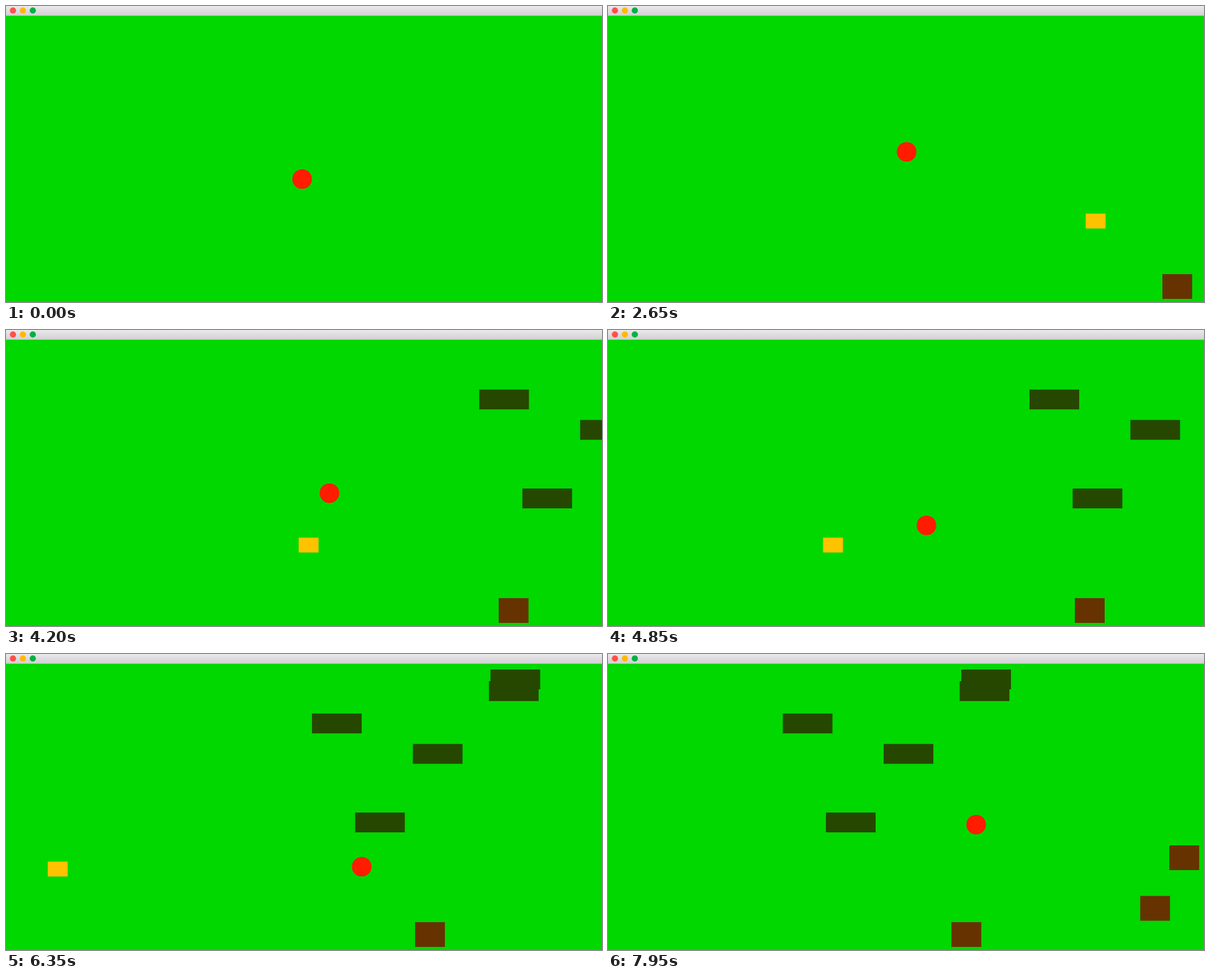
These frames come from a looping animation (960 px wide and 478 px high, 8 s). An HTML page with a canvas:

```html
<!DOCTYPE html>
<html lang="en">
<head>
<meta charset="utf-8">
<title>Dodge game</title>
<style>
html, body { margin: 0; width: 100%; height: 100%; overflow: hidden; background: #00d800; }
canvas { display: block; }
</style>
</head>
<body>
<canvas id="stage" width="960" height="478"></canvas>
<script>
const W = 960, H = 478, LOOP = 8000, TICK = 50, STEP = 4;
const ctx = document.getElementById('stage').getContext('2d');

// Ball waypoints: time, then steps right and down from home
const home = { x: 477, y: 279.5 };
const route = [[0, 0, 0], [1300, 1, -3], [2650, 1, -11], [3500, 13, -18],
  [4850, 9, 9], [6350, 24, 16], [7950, 29, -1]];

function rect(color, x, y, w, h) {
  ctx.fillStyle = color;
  ctx.fillRect(x, y, w, h);
}

function disc(color, x, y, r) {
  ctx.fillStyle = color;
  ctx.beginPath();
  ctx.arc(x, y, r, 0, Math.PI * 2);
  ctx.fill();
}

// Steady scroll with one short lag
function scrollAt(t) {
  return 0.0641 * (t - 2650) - 3.2 * Math.exp(-(((t - 6400) / 300) ** 2));
}

function drawBlocks(t) {
  const d = scrollAt(t);
  const block = (color, speed, w, h) => (x, y) => rect(color, x - d * speed, y, w, h);
  const crate = block('#663300', 1, 48, 40);
  const log = block('#264700', 2, 80, 32);
  const coin = block('#ffc200', 3, 32, 24);

  crate(893, 433);
  crate(1197, 390.7);
  crate(1244, 309);
  log(961, 96.2);
  log(1030.5, 256);
  log(1123.5, 145.3);
  log(1246, 44);
  log(1248.5, 25);
  coin(769.5, 335.3);
}

function drawBall(t) {
  const next = Math.max(1, route.findIndex(p => p[0] >= t));
  const [t0, x0, y0] = route[next - 1], [t1, x1, y1] = route[next];
  const p = (t - t0) / (t1 - t0);
  const along = (a, b) => Math.round(a + (b - a) * p) * STEP;
  disc('#ff1c00', home.x + along(x0, x1), home.y + along(y0, y1), 15.8);
}

const barFill = ctx.createLinearGradient(0, 0, 0, 15);
barFill.addColorStop(0, '#ebe9eb');
barFill.addColorStop(1, '#d2d0d2');

function drawBar() {
  rect(barFill, 0, 0, W, 15);
  rect('#b4b4b4', 0, 15, W, 1);
  ['#ff5147', '#ffb900', '#00b144'].forEach((c, i) => disc(c, 11.2 + i * 16, 7.3, 5));
}

function draw(t) {
  rect('#00d800', 0, 0, W, H);
  if (t >= 1700) drawBlocks(t);
  drawBall(t);
  drawBar();
}

const start = performance.now();
function frame() {
  const t = Math.max(0, performance.now() - start) % LOOP;
  draw(Math.floor(t / TICK) * TICK);
  requestAnimationFrame(frame);
}
frame();
</script>
</body>
</html>
```
